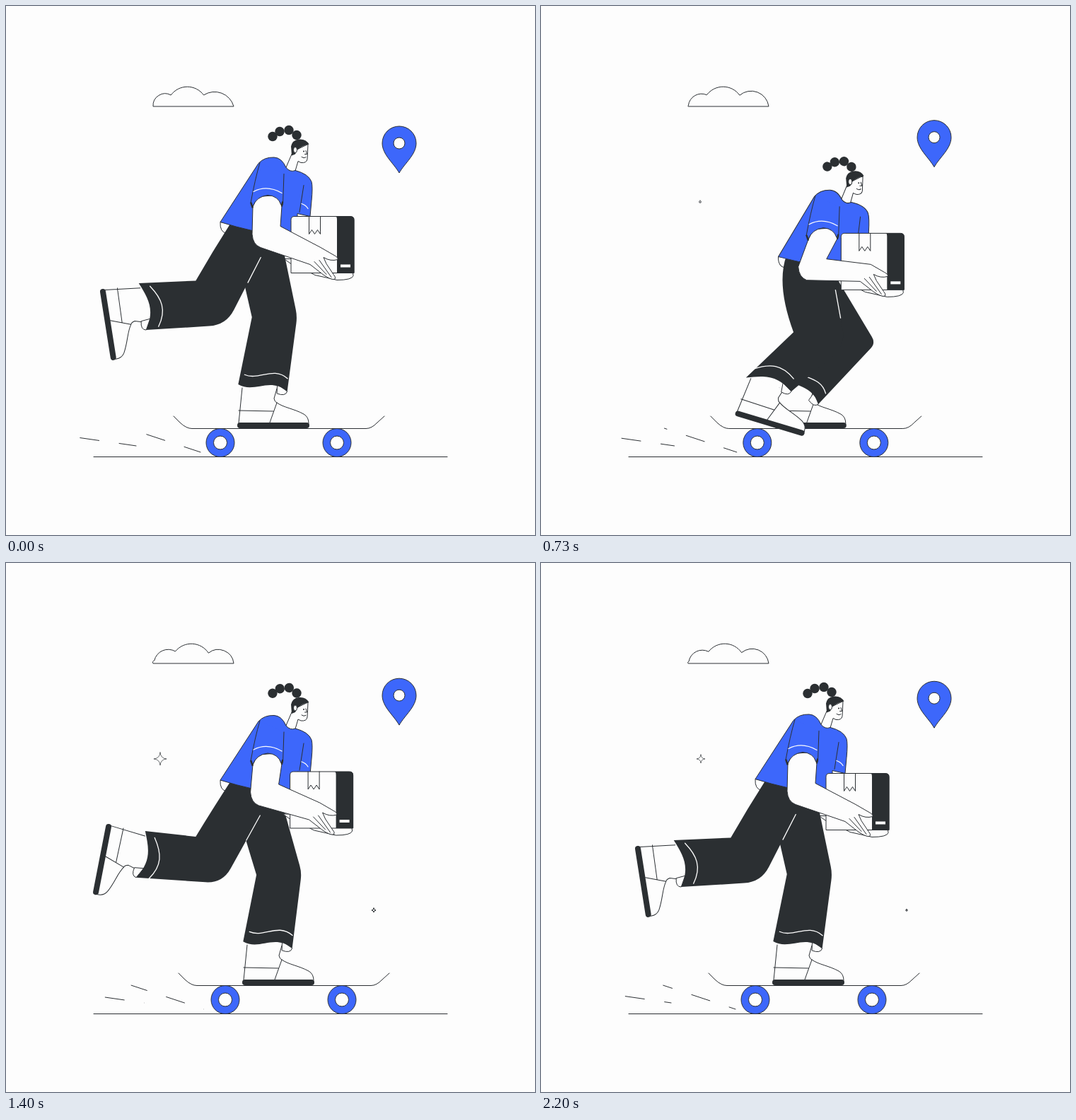
An HTML page for the animation above (2270 ms loop, 748 by 748 pixels).

```html
<!DOCTYPE html>
<html lang="en">
<head>
<meta charset="utf-8">
<title>Skateboard delivery</title>
<style>
html, body { margin: 0; width: 100%; height: 100%; overflow: hidden; background: #fdfdfd; }
svg { display: block; width: 100vw; height: 100vh; }
.line { fill: none; stroke: #2c3034; stroke-width: 1; stroke-linecap: round; stroke-linejoin: round; }
.white { fill: #fdfdfd; stroke: #2c3034; stroke-width: 1; stroke-linejoin: round; }
.blue { fill: #3d67fb; stroke: #2c3034; stroke-width: 1; stroke-linejoin: round; }
.dark { fill: #2b2f32; }
.seam { fill: none; stroke: #fdfdfd; stroke-width: 1.3; stroke-linecap: round; }
.sole { fill: none; stroke: #2b2f32; stroke-width: 8; stroke-linecap: round; }
.streak { fill: none; stroke: #2c3034; stroke-dasharray: 28; }
</style>
</head>
<body>
<svg viewBox="0 0 748 748">
  <defs>
    <g id="foot">
      <path fill="#fdfdfd" d="M3-53L-2-3H97Q97-12 90-16C75-24 62-25 52-32Q49-33 48-38L52-52Z"/>
      <path class="line" d="M3-53L-2-3M52-52L48-38Q49-33 52-32C62-25 75-24 90-16Q97-12 97-3M-2-21L47-20M52-32L42-4"/>
      <path class="sole" d="M0 0H94"/>
    </g>
    <g id="wheel">
      <circle class="blue" r="20"/>
      <circle class="white" r="9.5"/>
    </g>
  </defs>

  <path id="cloud" class="white"/>
  <g id="pin">
    <path class="blue" d="M556 236C548 222 532 210 532 194a24 24 0 0 1 48 0C580 210 564 222 556 236Z"/>
    <circle class="white" cx="556" cy="194" r="8"/>
  </g>
  <g id="stars"></g>

  <path class="line" d="M124 637.5H624"/>
  <path id="streakA" class="streak"/>
  <path id="streakB" class="streak"/>
  <g id="board">
    <path class="line" d="M-66 580l9 9Q-48 597.500-40 597.500H206Q214 597.500 222 589L232 580"/>
    <use href="#wheel" x="0" y="617.500"/>
    <use href="#wheel" x="165" y="617.500"/>
  </g>

  <g id="cuff"><path class="white" d="M303 305Q302 319 312 321L324 308Z"/></g>
  <use id="farFoot" href="#foot"/>
  <path id="farFold" class="white"/>
  <path id="farLeg" class="dark"/>
  <path id="farSeam" class="seam"/>
  <use id="nearFoot" href="#foot"/>
  <path id="nearFold" class="white"/>
  <path id="nearLeg" class="dark"/>
  <path id="nearSeam" class="seam"/>
  <path id="crease" class="seam"/>

  <g id="head">
    <path class="white" d="M406 205L427 195L426 216Q425 222 417 221L413 219L408 236L395 230L404 209Z"/>
    <path class="dark" d="M404 211L403 198Q405 189 414 188Q424 187 428.500 195Q418 197 412 203L409 209Z"/>
    <ellipse class="white" cx="409" cy="203" rx="2.500" ry="4"/>
    <circle class="dark" cx="421" cy="205" r="1"/>
    <path class="line" d="M424 204l1.500 5h-3M418 213q3 2.500 6 .5"/>
    <g id="braid" class="dark">
      <circle cx="377" cy="184" r="6.700"/>
      <circle cx="387" cy="177" r="6.700"/>
      <circle cx="400" cy="175" r="6.700"/>
      <circle cx="411" cy="182" r="6.700"/>
    </g>
  </g>

  <g id="torso">
    <path class="blue" d="M357 222Q365 213 379 213.500Q390 214 396 228Q402 235 409 232Q428 237 432 248Q434 255 432 275L430 297L412 293V320L352 318Q325 312 303 305Z"/>
    <path class="line" d="M421 253L415 291"/>
    <path class="seam" d="M418 279Q424 281 427 286"/>
  </g>

  <path id="farArm" class="white"/>
  <g id="box">
    <path class="white" d="M0 80V5Q0 0 5 0H84Q89 0 89 5V80Z"/>
    <path class="dark" d="M65 80V5Q65 0 63 0H84Q89.500 0 89.500 5V80Z"/>
    <path class="line" d="M25.500 0V25l4-6 4 6 4-6 4 6V0"/>
    <rect x="70" y="68" width="14" height="4" fill="#fdfdfd"/>
  </g>
  <path id="arm" class="white"/>
  <path id="fingers" class="line"/>
  <g id="sleeve">
    <path fill="#3d67fb" d="M359 221Q352 245 346 278L349 283Q354 269 370 267Q385 268 389 281L391.500 280L393 237Z"/>
    <path class="line" d="M359 221Q352 245 346 278L349 283Q354 269 370 267Q385 268 389 281L391.500 280L393 237"/>
    <path class="line" style="stroke-width:2.500" d="M346.500 278L348.500 284M391 277L390 282"/>
    <path class="seam" d="M350 262Q369 252 390 264"/>
  </g>
</svg>

<script>
const LOOP = 2270, STEP = 1000 / 15, COUNT = 34, CYCLE = COUNT / 3;
const $ = id => document.getElementById(id);
const set = (id, name, value) => $(id).setAttribute(name, value);

// board x, shoulder x/y, torso lean, box drop, braid swing, heel x/y, sole angle
const rest = { board: 303, x: 378, y: 213.5, lean: 0, box: 84, braid: 0, hx: 137, hy: 404, sole: 81 };
const pass = { board: 288, x: 382, y: 215, lean: -9, box: 74, braid: -6, hx: 262, hy: 521, sole: 33 };
const plant = { board: 284, x: 416, y: 271, lean: -4.5, box: 64, braid: -17, hx: 401, hy: 621, sole: -5 };
const push = { board: 320, x: 397, y: 246, lean: -1, box: 61, braid: 19, hx: 184, hy: 520, sole: 43 };
const kick = { board: 310, x: 378, y: 215, lean: 0, box: 80, braid: 3, hx: 145, hy: 373, sole: 101 };
const keys = [[0, rest], [3, pass], [7, plant], [14, push], [21, kick], [26, rest]];

const stars = [
  { x: [512, 520, 517], y: 491, lag: 1, life: 10, size: 7.5, alpha: 1 },
  { x: [672, 668, 655], y: 356, lag: 1, life: 8, size: 6, alpha: .8 },
  { x: [225, 218, 226], y: 277, lag: 6, life: 5.3, size: 11, alpha: .7 }
];

function key(i) {
  const m = keys.length, turn = Math.floor(i / m), [n, pose] = keys[i - turn * m];
  return { n: n + turn * COUNT, pose };
}

// Smooth cyclic blend that never overshoots a key pose.
function poseAt(n) {
  let i = keys.length - 1;
  while (keys[i][0] > n) i--;
  const [a, b, c, d] = [-1, 0, 1, 2].map(k => key(i + k));
  const h = c.n - b.n, u = (n - b.n) / h, out = {};
  const mean = (p, q) => p * q > 0 ? 2 * p * q / (p + q) : 0;
  for (const k in rest) {
    const slope = (p, q) => (q.pose[k] - p.pose[k]) / (q.n - p.n);
    const mid = slope(b, c), s = mean(slope(a, b), mid) * h, e = mean(mid, slope(c, d)) * h;
    out[k] = b.pose[k] + mid * h * u * u * (3 - 2 * u) + s * u * (1 - u) ** 2 - e * u * u * (1 - u);
  }
  return out;
}

const pt = p => p[0].toFixed(2) + ' ' + p[1].toFixed(2);
const plus = (p, x, y) => [p[0] + x, p[1] + y];
const dist = (a, b) => Math.hypot(b[0] - a[0], b[1] - a[1]);

function toward(a, b, d) {
  const k = d / dist(a, b);
  return [a[0] + (b[0] - a[0]) * k, a[1] + (b[1] - a[1]) * k];
}

// Maps local coordinates at origin o turned by r radians.
function frame(o, r) {
  const c = Math.cos(r), s = Math.sin(r);
  return (x, y) => [o[0] + x * c - y * s, o[1] + x * s + y * c];
}

// Two-bone leg: knee centre with its back and front points.
function bendKnee(hip, ankle, thigh, shin, half) {
  const d = dist(hip, ankle), a = (d * d + thigh * thigh - shin * shin) / (2 * d);
  const h = Math.sqrt(Math.max(0, thigh * thigh - a * a));
  const f = frame(hip, Math.atan2(ankle[1] - hip[1], ankle[0] - hip[0]));
  return { mid: f(a, -h), back: f(a, half - h), front: f(a, -half - h) };
}

// Trouser hem; dip bends its back half down into a wave.
function hem(back, front, dip) {
  const L = dist(back, front), f = frame(back, Math.atan2(front[1] - back[1], front[0] - back[0]));
  const p = (x, y) => pt(f(x * L, y));
  return {
    edge: `L${p(0, 0)}C${p(.35, dip)} ${p(.6, -17)} ${p(1, 0)}`,
    seam: `M${p(.1, -15)}C${p(.4, dip - 19)} ${p(.65, -33)} ${p(.97, -18)}`,
    fold: `M${p(1, 0)}Q${p(.98, 8)} ${p(.8, 5)}L${p(.78, -8)}Z`
  };
}

const bend = (a, k, b, r) => `L${pt(toward(k, a, r))}Q${pt(k)} ${pt(toward(k, b, r))}`;

function drawSky(n) {
  // Notches between the bumps drift left under a dome.
  const pts = [[322, 142]];
  for (let a = n % CYCLE; a < COUNT; a += CYCLE) {
    const u = a / COUNT;
    pts.push([322 - 114 * u - 13 * Math.sin(Math.PI * u * u), 142 - 18 * Math.sin(Math.PI * u) ** .8]);
  }
  pts.push([208, 142]);
  let d = 'M322 142';
  for (let i = 1; i < pts.length; i++) {
    const edge = i === 1 || i === pts.length - 1;
    const r = dist(pts[i - 1], pts[i]) * (edge ? .57 : .62);
    d += `A${r} ${r} 0 0 0 ${pt(pts[i])}`;
  }
  set('cloud', 'd', d + 'Z');

  const lift = -9 * Math.abs(Math.sin(Math.PI * n * 2 / COUNT)) ** .7;
  set('pin', 'transform', `translate(0 ${lift})`);

  $('stars').innerHTML = stars.map(({ x, y, lag, life, size, alpha }) => {
    const u = (n % CYCLE - lag) / life;
    if (u <= 0 || u >= 1) return '';
    const s = size * Math.sin(Math.PI * u), k = s * .07;
    return `<path class="line" opacity="${alpha}" transform="translate(${x[Math.floor(n / CYCLE)]} ${y})"
      d="M0 ${-s}Q${k} ${-k} ${s} 0Q${k} ${k} 0 ${s}Q${-k} ${k} ${-s} 0Q${-k} ${-k} 0 ${-s}Z"/>`;
  }).join('');
}

function drawBoard(n, bx) {
  set('board', 'transform', `translate(${bx} 0)`);
  const a = 186 + 1.6 * (bx - 304), b = 276 + .62 * (bx - 304);
  set('streakA', 'd', `M${a} 622L${a - 80} 610.5`);
  set('streakB', 'd', `M${b} 631L${b - 103} 597`);
  // Nine dash periods per loop.
  for (const id of ['streakA', 'streakB']) set(id, 'stroke-dashoffset', 3 - n * 9 * 56 / COUNT);
}

function drawPart(side, foot, cuff, leg) {
  set(side + 'Foot', 'transform', foot);
  set(side + 'Leg', 'd', leg);
  set(side + 'Seam', 'd', cuff.seam);
  set(side + 'Fold', 'd', cuff.fold);
}

function drawLegs(p, S) {
  const ankle = [p.board + 60, 540];
  const far = bendKnee(plus(S, -18, 135), ankle, 93, 102, 32);
  const f = frame(ankle, .85 * Math.atan2(far.mid[0] - ankle[0], ankle[1] - far.mid[1]));
  const farCuff = hem(f(-35, 0), f(35, 0), 10), front = plus(S, 14, 130);
  drawPart('far', `translate(${p.board + 28} 593)`, farCuff,
    `M${pt(plus(S, -50, 140))}L${pt(far.back)}${farCuff.edge}${bend(f(35, 0), far.front, front, 10)}` +
    `L${pt(front)}L${pt(plus(S, 8, 108))}Z`);

  const g = frame([p.hx, p.hy], p.sole * Math.PI / 180), nearCuff = hem(g(-4, -52), g(63, -52), -10);
  const near = bendKnee(plus(S, -45, 115), g(29, -52), 101, 97, 38);
  const reach = near.mid[0] - S[0], crotch = plus(S, 14 + .36 * reach, 142);
  drawPart('near', `translate(${p.hx} ${p.hy}) rotate(${p.sole})`, nearCuff,
    `M${pt(plus(S, -60, 93))}Q${pt(plus(S, -73 + .15 * reach, 134))} ${pt(near.back)}${nearCuff.edge}` +
    `${bend(g(63, -52), near.front, crotch, 24)}L${pt(crotch)}L${pt(plus(S, 12, 112))}L${pt(plus(S, -30, 90))}Z`);
  set('crease', 'd', `M${pt(crotch)}L${pt(toward(crotch, near.front, 40))}`);
}

function drawBody(p, S) {
  const move = (x, y) => `translate(${S[0] - 378 + x} ${S[1] - 213 + y})`;
  for (const id of ['torso', 'cuff']) set(id, 'transform', `${move(0, 0)} rotate(${p.lean} 378 213)`);
  set('sleeve', 'transform', move(0, 0));
  set('head', 'transform', `${move(.44 * p.lean, .6 * p.lean)} rotate(${.4 * p.lean} 409 203)`);
  set('braid', 'transform', `rotate(${p.braid} 411 182)`);

  // Lifting the box pulls it in and the elbow back.
  const lift = 84 - p.box, B = plus(S, 25 - .35 * lift, p.box), E = plus(S, -28 - .6 * lift, 117);
  const b = (x, y) => pt(plus(B, x, y)), e = (x, y) => pt(plus(E, x, y)), s = (x, y) => pt(plus(S, x, y));
  set('box', 'transform', `translate(${pt(B)})`);
  set('farArm', 'd', `M${b(-10, 60)}L${b(0, 67)}Q${b(20, 75)} ${b(34, 83)}Q${b(52, 87)} ${b(65, 90)}` +
    `Q${b(86, 90)} ${b(88, 84)}L${b(87, 76)}L${b(0, 60)}Z`);
  set('arm', 'd', `M${s(-29, 70)}L${e(-2, -8)}Q${e(-1, 7)} ${e(10, 11)}L${b(27, 68)}` +
    `L${b(45, 82)}Q${b(56, 90)} ${b(62, 89)}Q${b(64, 86)} ${b(60, 82)}L${b(50, 67)}L${b(46, 58)}` +
    `Q${b(56, 64)} ${b(66, 61)}Q${b(67, 58)} ${b(61, 55)}L${b(42, 44)}L${e(38, -19)}` +
    `L${s(12, 69)}L${s(6, 54)}L${s(-22, 56)}Z`);
  set('fingers', 'd', `M${b(33, 64)}L${b(50, 82)}M${b(40, 62)}L${b(57, 86)}`);
}

function draw(n) {
  const p = poseAt(n), S = [p.x, p.y];
  drawSky(n);
  drawBoard(n, p.board);
  drawLegs(p, S);
  drawBody(p, S);
}

const start = performance.now();
let shown = -1;

function tick() {
  const t = (performance.now() - start) % LOOP;
  const n = Math.min(COUNT - 1, Math.floor((t + 4) / STEP));
  if (n !== shown) draw(shown = n);
  requestAnimationFrame(tick);
}
tick();
</script>
</body>
</html>
```
